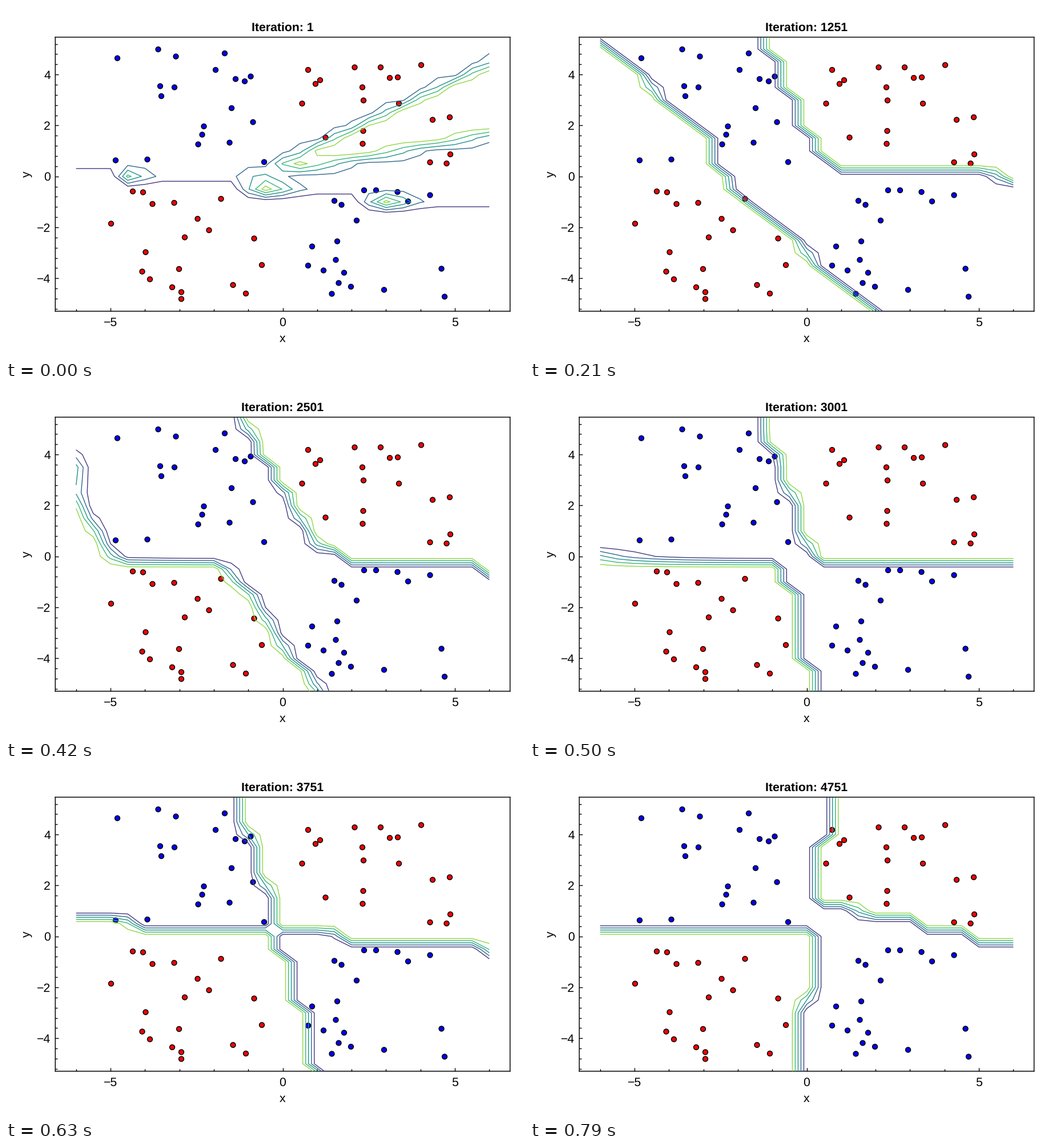
A matplotlib script for the animation above (830 ms loop, 907 by 617 pixels).

```python
import numpy as np
import matplotlib.pyplot as plt
from matplotlib.animation import FuncAnimation

W, H = 907, 617
PT = 0.72  # points per pixel at 100 dpi
OFF = 7    # an edge beyond the grid
LEFT, TOP, RIGHT, BOTTOM = 86.3, 54.6, 882.6, 535
X0, Y0, SX, SY = 484.5, 298.7, 60.3, 44.65
GRID = np.arange(-6, 6.01, 0.5)
X, Y = np.meshgrid(GRID, GRID)
LEVELS = np.arange(1, 6) / 6
COLORS = [plt.cm.viridis(v) for v in LEVELS]

plt.rcParams.update({"font.family": "Liberation Sans", "font.size": 21.33 * PT,
                     "text.hinting": "none"})

fig = plt.figure(figsize=(W / 100, H / 100), dpi=100, facecolor="white")
ax = fig.add_axes([LEFT / W, 1 - BOTTOM / H, (RIGHT - LEFT) / W, (BOTTOM - TOP) / H])
ax.set_autoscale_on(False)
ax.set_xlim((LEFT - X0) / SX, (RIGHT - X0) / SX)
ax.set_ylim((Y0 - BOTTOM) / SY, (Y0 - TOP) / SY)


def label(x, y, text, **kw):
    return fig.text(x / W, 1 - y / H, text, **{"ha": "center", "va": "baseline", **kw})


# ---- axes, ticks and labels
ax.set_xticks([-5, 0, 5], [])
ax.set_yticks([-4, -2, 0, 2, 4], [])
ax.set_xticks(np.arange(-6, 7), minor=True)
ax.set_yticks(np.arange(-5.2, 5.3, 0.4), minor=True)
ax.tick_params(direction="in", width=1.4 * PT, length=6 * PT)
ax.tick_params(which="minor", direction="in", width=1.4 * PT, length=4 * PT)
for spine in ax.spines.values():
    spine.set(linewidth=1.5 * PT, snap=False)

for v in ax.get_xticks():
    label(X0 + v * SX, 561, f"{v:.0f}".replace("-", "−"))
for v in ax.get_yticks():
    label(78, Y0 - v * SY + 7.5, f"{v:.0f}".replace("-", "−"), ha="right")
label(X0, 589, "x")
label(36.5, 295, "y", rotation=90, va="center")
title = label(X0, 44, "", weight="bold")

# ---- samples of the two classes, in stage pixels
red = [
    (529, 112), (610.5, 107.5), (656, 107.5), (727, 103.5), (542, 136.5),
    (550, 130), (624, 142.5), (672, 126), (686, 125), (518.5, 171),
    (626, 165.5), (688, 171), (559.5, 230.5), (625.5, 219), (624.5, 241.5),
    (747, 199.5), (777, 195), (778, 260), (742.5, 274), (771.5, 276),
    (222, 325), (240, 326.5), (256.5, 347), (294.5, 345), (376.5, 338),
    (184, 381.5), (335.5, 373), (355.5, 393), (313, 405.5), (434.5, 407.5),
    (244.5, 431.5), (448, 454), (238.5, 465.5), (252, 479), (303, 461),
    (291, 493), (307, 501.5), (307, 513.5), (397.5, 489), (420, 504)]
blue = [
    (195, 91.5), (266.5, 76), (297.5, 88.5), (383, 83), (367, 112),
    (402, 128), (418, 132), (428.5, 123.5), (270, 140.5), (295, 142.5),
    (272, 158), (395, 179), (432.5, 203.5), (346.5, 211), (343.5, 225.5),
    (336.5, 242.5), (391.5, 239.5), (192, 270.5), (247.5, 269), (452, 273.5),
    (627, 323), (648, 323), (685.5, 326), (704, 342.5), (742.5, 331.5),
    (575, 341.5), (587.5, 348.5), (614, 376), (580, 412.5), (536, 421.5),
    (529, 455), (577.5, 445), (556, 463.5), (592, 467.5), (582.5, 485.5),
    (604, 492), (570.5, 504.5), (662, 497.5), (762.5, 460.5), (768, 509.5)]
px, py = np.array(red + blue).T
ax.scatter((px - X0) / SX, (Y0 - py) / SY, s=(8.8 * PT) ** 2,
           c=["red"] * len(red) + ["blue"] * len(blue),
           edgecolors="black", linewidths=1.5 * PT, zorder=2)


def ramp(d):
    return np.clip(d, 0, 1)


def untrained():
    """A stepped floor with a bump on each step and one rising wedge."""
    floor = 0.5 - 0.5 * np.floor((X + 8.3) / 3.6)
    inside = np.minimum(0.62 + 0.64 * X - Y, Y - 0.1 - 0.25 * X)
    z = 0.27 + 0.73 * ramp(inside / 0.5 + 0.33)
    for x, y, peak in ((-4.5, 0, 0.72), (-0.5, -0.5, 0.93), (3, -1, 0.9)):
        slope = np.where(X > x, 0.55, 0.9)
        z = np.maximum(z, np.where(Y == y, peak - slope * abs(X - x), 0))
    return np.where(Y > floor - 0.1, z, 0)


# ---- trained states: the blue class fills a band between a left and a right
# edge, each a path through a few (y, x) corners
keys = {}


def key(step, left, right, soft=0.2, tail=0.0):
    rows = []
    for corners in (left, right):
        y, x = np.array(corners).T
        rows.append(np.interp(-GRID, -y, x))
    keys[step] = np.array([*rows, np.full(GRID.size, soft), np.full(GRID.size, tail)])


key(2,
    [(5.5, -5.54), (3.5, -4.25), (1.5, -2.75), (0.5, -2.46), (-0.5, -1.75),
     (-1, -1.75), (-2, -0.75), (-2.5, -0.75), (-4.5, 1.25), (-5, 1.25), (-5.5, 1.75)],
    [(3, -0.25), (2.5, -0.07), (1.5, 0.04), (1, 0.25), (0.5, 0.25), (0, 1.25),
     (-0.5, 3.94), (-1, OFF)])
key(5,
    [(5.5, -6.25), (4, -4.75), (3, -4.25), (1.5, -2.75), (0.5, -2.75), (-1, -1.75),
     (-2.5, -0.25), (-3.5, 0.25), (-5.5, 2.25)],
    [(5, -1.25), (4.5, -0.75), (3.5, -0.75), (3, -0.25), (2, -0.25), (1.5, 0.25),
     (1, 0.25), (0.5, 0.75), (0, 5.52), (-0.5, OFF)])
key(8,
    [(5.5, -6.6), (4, -5.25), (3.5, -4.93), (2.5, -5.03), (2, -4.7), (-5.5, 2.05)],
    [(5.5, -1.05), (4, -0.25), (3.5, 0.25), (2.5, 0.6), (1.5, 1.25), (0.5, 1.97),
     (0, 3), (-0.5, 4.45), (-1, 5.5), (-1.5, OFF)],
    soft=0.85)
key(12,
    [(0, -OFF), (-0.5, -0.75), (-1, -0.75), (-1.5, -0.25), (-4, -0.25), (-4.5, 0.25)],
    [(5, -1.25), (4, -0.93), (3.5, -0.75), (3, -0.75), (2, -0.25), (1, -0.25),
     (0, 0.25), (-0.5, OFF)],
    tail=0.55)
key(15,
    [(1, -OFF), (0.5, -4.46), (0, -0.25), (-0.5, -0.25), (-1, 0.25), (-2.5, 0.25),
     (-3, 0.75), (-5, 0.75), (-5.5, 1.25)],
    [(4.5, -1.25), (3.5, -0.75), (2.5, -0.75), (1.5, -0.25), (0.5, -0.25),
     (0, 1.56), (-0.5, 5.96), (-1, OFF)])
key(19,
    [(0.5, -OFF), (0, 0.25), (-2, 0.25), (-3, -0.25)],
    [(4, 0.75), (3.5, 0.4), (1.5, 0.25), (1, 1.49), (0.5, 3.25), (0, 4.75),
     (-0.5, OFF)])
STEPS = sorted(keys)


def trained(step):
    """Class score on the grid, the edges gliding between trained states."""
    i = int(np.clip(np.searchsorted(STEPS, step, "right") - 1, 0, len(STEPS) - 2))
    a, b = STEPS[i], STEPS[i + 1]
    t = (step - a) / (b - a)
    left, right, soft, tail = ((1 - t) * keys[a] + t * keys[b])[:, :, None]
    z = np.maximum(ramp(0.5 + (left - X) / soft), ramp(0.5 + (X - right) / 0.2))
    return np.maximum(z, np.where(Y == 0, tail * np.exp(-0.75 * (X + 6)), 0))


drawn = []


def update(tick):
    step = (6 * tick + 2) // 25  # 24 pictures a second on a 10 ms clock
    while drawn:
        drawn.pop().remove()
    z = trained(step) if step else untrained()
    drawn.append(ax.contour(X, Y, z, levels=LEVELS, colors=COLORS,
                            linewidths=1.4 * PT, zorder=3))
    title.set_text(f"Iteration: {250 * step + 1}")
    return drawn


anim = FuncAnimation(fig, update, frames=83, interval=10, init_func=lambda: [],
                     repeat=True, repeat_delay=0, blit=False)
plt.show()
```
